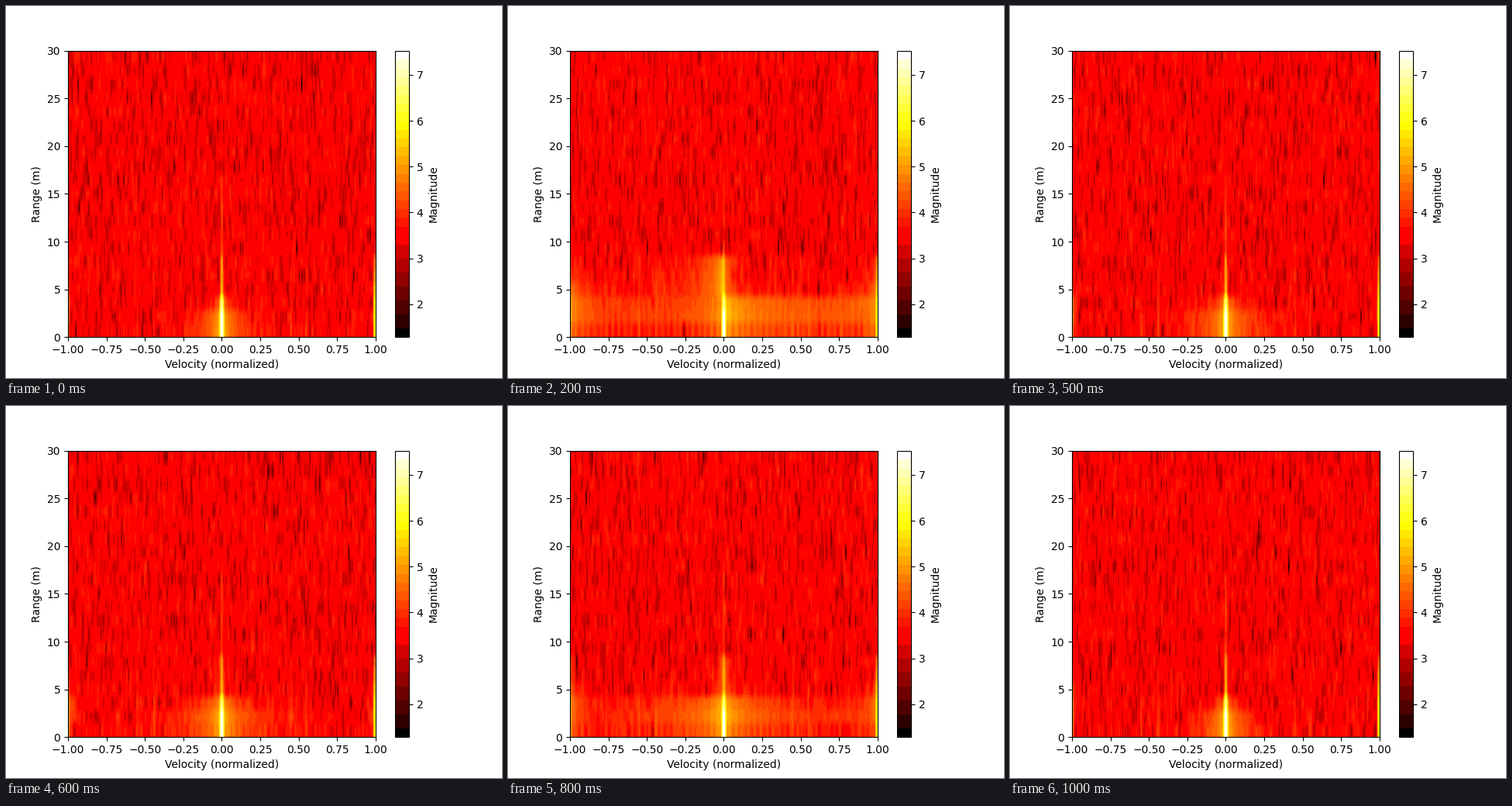
A matplotlib script for the animation above (1.1 s loop, 640x480 px).

```python
import numpy as np
import matplotlib.pyplot as plt
from matplotlib.animation import FuncAnimation
from matplotlib.colors import ListedColormap

ROWS, COLS = 21, 256
MID = COLS // 2
NEAR, FAR = 6, 12  # range bins with clutter, and with a faint centre line
VMIN, VMAX = 1.284, 7.527

# Clutter spread per sweep: 0 is a narrow line, 1 a full-width band
SPREAD = [0.0, 0.5, 0.95, 1.0, 0.9, 0.2, 0.45, 0.55, 0.75, 0.9, 0.05]
# How far the receding side of the band slides out in range
LEAN = [0.0, 0.2, 0.4, 0.2, 0.0, 0.0, 0.0, 0.0, 0.0, 0.0, 0.0]

v = np.linspace(-1, 1, COLS, endpoint=False) + 1 / COLS
row = np.arange(NEAR)[:, None]


def column(*values):
    return np.array(values)[:, None]


NARROW_DROP = column(0.05, 0.15, 0.8, 2, 2, 2)
WIDE_DROP = column(0.45, 0.05, 0.1, 0.7, 0.8, 0.9)
EDGE_PEAK = column(4.9, 5.2, 5.2, 4.8, 4.4, 4.2)
LEFT_LINE = column(5.4, 5.3, 5.1, 4.4, 4.1, 3.8)
RIGHT_LINE = column(5.9, 6.1, 5.9, 5.5, 5.1, 4.7)
CENTRE_LINE = column(7.5, 7.5, 6.7, 5.1, 5.0, 4.9)


def banded_hot():
    """Hot colormap reduced to flat bands, wider in the dark part."""
    edges = np.r_[0, np.linspace(0.03, 0.322, 7), np.linspace(0.385, 1, 21)]
    colors = plt.get_cmap("hot")((edges[:-1] + edges[1:]) / 2)
    colors[0, :3] = 0
    colors[7, :3] = 1, 0, 0
    colors[-1, :3] = 1
    x = (np.arange(740) + 0.5) / 740
    return ListedColormap(colors[np.searchsorted(edges, x) - 1])


def clutter(spread, lean):
    """Amplitude of the static returns in the nearest range bins."""
    drop = NARROW_DROP + spread * (WIDE_DROP - NARROW_DROP)
    rate = 1.8 - 0.88 * spread + 0.5 * (row >= 3)
    halo = 5.75 - drop - rate * np.log10(1 + np.abs(v) / 0.02)
    halo += lean * (v < 0) * np.where(row < 3, -1, 1.5)

    gap = 1 - np.abs(v)
    edge = EDGE_PEAK - 0.5 * (1 - spread)
    edge = edge - (3.8 - 2.8 * spread) * np.log10(1 + gap / 0.02)
    ripple = np.where(row == 0, 0.2, 0.07) * (row < 3) * spread
    amp = (10**halo + 10**edge) * 10 ** (ripple * np.cos(2 * np.pi * v / 0.04))

    for speed in (-0.55, -0.44, 0.45, 0.55):
        amp += 10 ** (4.1 - 0.1 * row - ((v - speed) / 0.01) ** 2)

    amp[:, MID - 1:MID + 1] += 10**CENTRE_LINE
    amp[:, [MID - 2, MID + 1]] += 10 ** (CENTRE_LINE - 1.2)
    amp[:, :1] += 10**LEFT_LINE
    amp[:, -1:] += 10**RIGHT_LINE
    amp[:, -2:-1] += 10 ** (RIGHT_LINE - 0.6)
    return amp


def receiver_noise(rng):
    """Complex noise, slightly smeared over velocity by the window."""
    noise = rng.normal(size=(ROWS, COLS)) + 1j * rng.normal(size=(ROWS, COLS))
    side = 0.4
    smear = noise + side * (np.roll(noise, 1, 1) + np.roll(noise, -1, 1))
    return smear / np.sqrt(1 + 2 * side**2)


def sweep(i):
    signal = receiver_noise(np.random.default_rng(40 + i)) * 10**3.4
    signal[:NEAR] += clutter(SPREAD[i], LEAN[i])
    signal[NEAR:FAR, MID - 1:MID + 1] += 10 ** (4.05 - 0.2 * SPREAD[i])
    return np.clip(np.log10(np.abs(signal)), VMIN, VMAX)


fig, ax = plt.subplots(figsize=(6.4, 4.8), dpi=100)
image = ax.imshow(sweep(0), cmap=banded_hot(), vmin=VMIN, vmax=VMAX,
                  origin="lower", aspect="auto", extent=(-1, 1, 0, 30),
                  interpolation="hanning")
ax.set_xlabel("Velocity (normalized)")
ax.set_ylabel("Range (m)")
fig.colorbar(image, ax=ax, label="Magnitude")


def update(i):
    image.set_data(sweep(i))
    return [image]


anim = FuncAnimation(fig, update, frames=len(SPREAD), interval=100, repeat=True)
plt.show()
```
